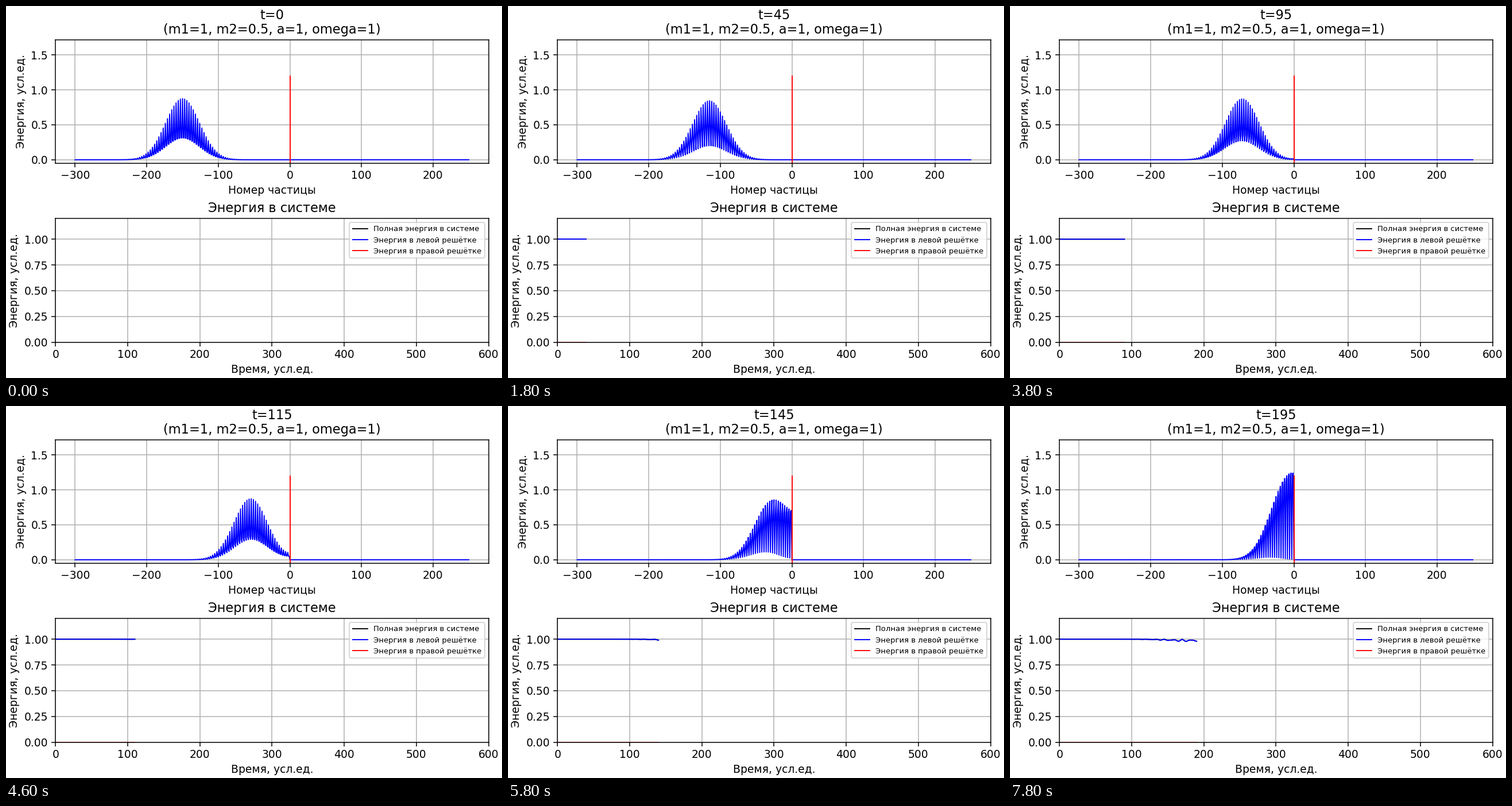
These frames come from a looping animation (864x648 px, 8 s). A matplotlib script:

```python
import numpy as np
import matplotlib.pyplot as plt
from matplotlib.animation import FuncAnimation

W, H, DPI = 864, 648, 135
FRAMES, STEP = 40, 5
DT = 0.02
N_LEFT, N_RIGHT, CENTER = -300, 250, -150
BETA, OMEGA = 0.03, 1.0

n = np.arange(N_LEFT, N_RIGHT + 1)
wall = -N_LEFT  # index of the fixed boundary particle


def accel(u):
    a = np.zeros_like(u)
    a[1:wall] = u[2:wall + 1] - 2 * u[1:wall] + u[:wall - 1]
    return a


def energy(u, v):
    """Kinetic energy plus half of each neighbouring spring."""
    e = np.zeros_like(u)
    spring = np.diff(u) ** 2 / 4
    e[1:wall] = v[1:wall] ** 2 / 2 + spring[:wall - 1] + spring[1:wall]
    return e


def simulate():
    """Energy profiles of a wave packet at times 0, STEP, 2*STEP, ..."""
    k = 2 * np.arcsin(OMEGA / 2)
    speed = np.cos(k / 2)
    x = n - CENTER
    env = np.exp(-(BETA * x) ** 2 / 2)
    u = env * np.sin(k * n)
    v = -env * (OMEGA * np.cos(k * n) - BETA ** 2 * speed * x * np.sin(k * n))
    u[wall:] = v[wall:] = 0
    profiles = [energy(u, v)]
    a = accel(u)
    for _ in range(FRAMES - 2):
        for _ in range(round(STEP / DT)):
            v += a * DT / 2
            u += v * DT
            a = accel(u)
            v += a * DT / 2
        profiles.append(energy(u, v))
    return np.array(profiles)


def add_panel(y0, y1, xlabel):
    """Axes between pixel rows y0 and y1, counted from the top."""
    x0, x1 = 86.2, 840.5
    ax = fig.add_axes([x0 / W, 1 - y1 / H, (x1 - x0) / W, (y1 - y0) / H])
    ax.tick_params(axis="x", pad=3.1)
    ax.set_xlabel(xlabel, labelpad=3.6)
    ax.set_ylabel("Энергия, усл.ед.")
    ax.grid()
    return ax


profiles = simulate()
sums = profiles.sum(axis=1) / profiles[0].sum()
times = STEP * np.arange(FRAMES)
# the energy record lags one step behind its time stamp
left_energy = np.concatenate(([sums[0]], sums))

fig = plt.figure(figsize=(W / DPI, H / DPI), dpi=DPI)
top = add_panel(58.9, 273.9, "Номер частицы")
bottom = add_panel(370.4, 585.5, "Время, усл.ед.")

wave, = top.plot(n, profiles[0], color="blue", lw=1)
top.plot([0, 0], [-0.1, 1.2], color="red", lw=1)
top.set_xlim(-327.5, 277.5)
top.set_ylim(-0.05, 1.716)

total, = bottom.plot([], [], color="black", lw=1,
                     label="Полная энергия в системе")
left, = bottom.plot([], [], color="blue", lw=1,
                    label="Энергия в левой решётке")
right, = bottom.plot([], [], color="red", lw=1,
                     label="Энергия в правой решётке")
bottom.set_xlim(0, 600)
bottom.set_ylim(0, 1.2)
bottom.set_title("Энергия в системе")
bottom.legend(loc="upper right", fontsize=7, labelspacing=0.48)


def update(i):
    top.set_title(f"t={times[i]}\n(m1=1, m2=0.5, a=1, omega=1)",
                  linespacing=1.11)
    wave.set_ydata(profiles[max(i - 1, 0)])
    total.set_data(times[:i], left_energy[:i])
    left.set_data(times[:i], left_energy[:i])
    right.set_data(times[:i], np.zeros(i))
    return wave, total, left, right


update(0)
anim = FuncAnimation(fig, update, frames=FRAMES, interval=200,
                     repeat=True, repeat_delay=0, blit=False)
plt.show()
```
